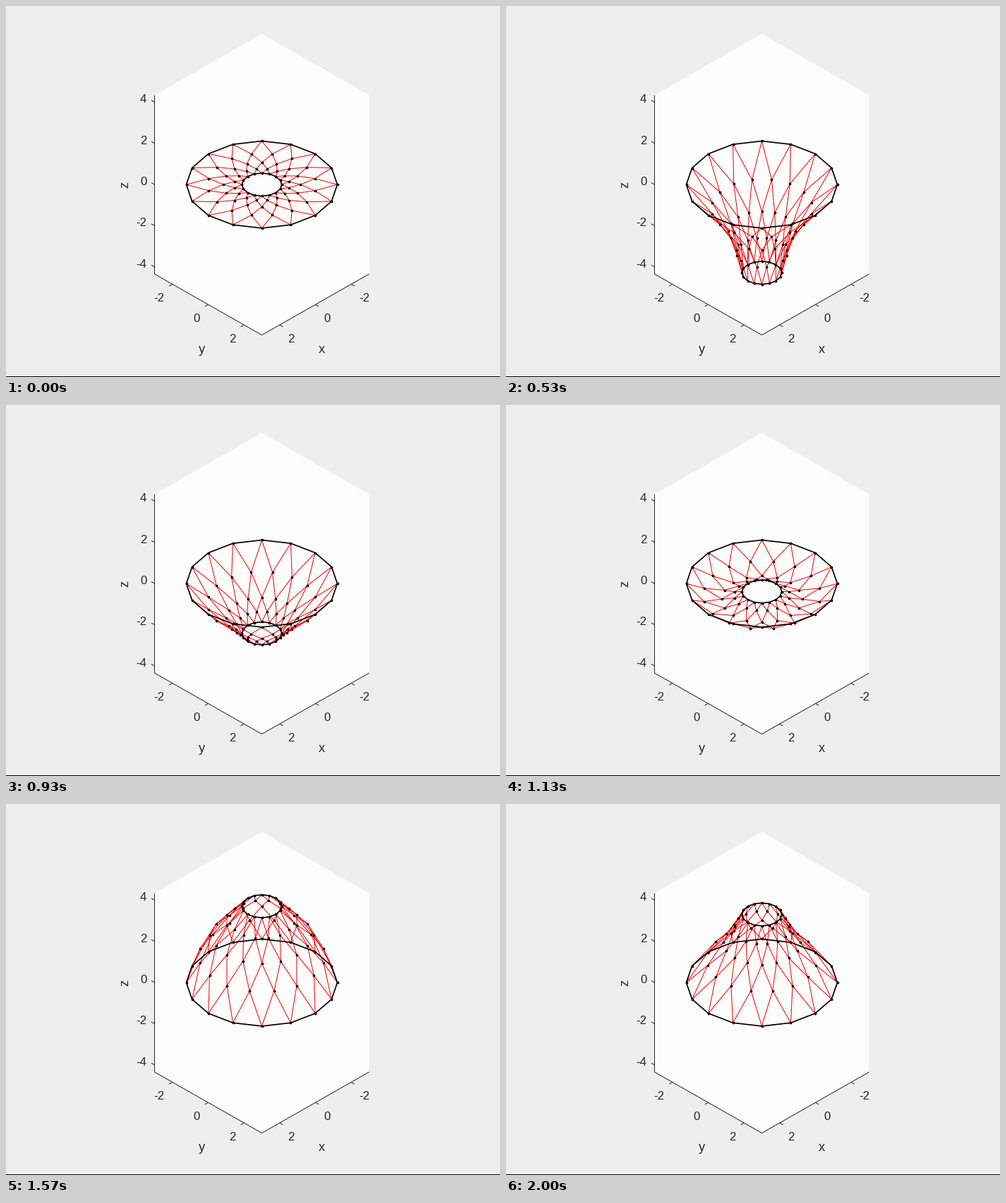
These frames come from a looping animation (700 by 526 pixels, 2030 ms). A matplotlib script:

```python
import numpy as np
import matplotlib.pyplot as plt
from matplotlib.animation import FuncAnimation
from matplotlib.collections import LineCollection
from matplotlib.patches import Polygon, Rectangle

W, H, DPI = 700, 526, 100
PT = 72 / DPI                       # points per pixel
CX, CY = 362.5, 253.2               # projected origin
TILT = 0.577                        # sine of the view elevation
UNIT = 29.2                         # pixels per unit of z
N, R_OUT, R_IN = 16, 107, 28.2
INK = "#262626"

# Poses of the three free rings: radius and drop in pixels
STEP = np.array([0, 4, 10, 22, 34, 41, 53, 60])
RADIUS = np.array([
    [76.5, 54.7, 39.0], [76.0, 53.6, 38.0], [73.9, 50.4, 36.0],
    [71.2, 47.0, 36.5], [83.6, 57.0, 39.4], [85.0, 66.5, 46.0],
    [89.6, 67.3, 44.6], [78.5, 54.4, 40.3]])
DROP = np.array([
    [0, 0, 0], [8.8, 17.8, 28.5], [26.3, 50.1, 72.0],
    [30.4, 60.6, 90.0], [16.0, 22.0, 16.0], [-22.0, -40.4, -50.8],
    [-41.0, -72.3, -101.6], [-32.9, -56.9, -78.0]])
SHARE = np.array([0.29, 0.56, 0.79])  # quasi-static part of the hub's drop


def hub_drop(step):
    """Free swing of the hub on a hardening spring."""
    p = 0.0895 * step
    return 123.55 * np.sin(p) - 2.95 * np.sin(3 * p)


LAG = DROP - np.outer(hub_drop(STEP), SHARE)


def hermite(x, knots, values):
    slope = np.gradient(values, knots, axis=0)
    i = min(np.searchsorted(knots, x, side="right") - 1, len(knots) - 2)
    h = knots[i + 1] - knots[i]
    u = (x - knots[i]) / h
    return ((1 + 2 * u) * (1 - u) ** 2 * values[i]
            + u * (1 - u) ** 2 * h * slope[i]
            + u * u * (3 - 2 * u) * values[i + 1]
            + u * u * (u - 1) * h * slope[i + 1])


def net(step):
    """Screen positions, shape (ring, node, xy)."""
    hub = hub_drop(step)
    r = np.r_[R_OUT, hermite(step, STEP, RADIUS), R_IN]
    d = np.r_[0, SHARE * hub + hermite(step, STEP, LAG), hub]
    turn = np.arange(N) + 0.5 * (np.arange(5) % 2)[:, None]
    a = 2 * np.pi * turn / N
    x = CX + r[:, None] * np.sin(a)
    y = CY + d[:, None] - TILT * r[:, None] * np.cos(a)
    return np.stack([x, y], axis=-1)


def cables(p):
    """Two cables from every node to the next ring inward."""
    segs = []
    for i in range(4):
        side = -1 if i % 2 == 0 else 1
        for shift in (0, side):
            mate = np.roll(p[i + 1], -shift, axis=0)
            segs.append(np.stack([p[i], mate], axis=1))
    return np.concatenate(segs)


fig = plt.figure(figsize=(W / DPI, H / DPI), dpi=DPI, facecolor="#eeeeee")
ax = fig.add_axes([0, 0, 1, 1])
ax.set(xlim=(0, W), ylim=(H, 0))
ax.axis("off")


def line(*pts):
    ax.plot(*zip(*pts), color=INK, lw=1.0 * PT, zorder=2,
            solid_capstyle="butt")


def label(x, y, s, px=16.7, **kw):
    opts = dict(ha="center", va="baseline")
    opts.update(kw)
    ax.text(x, y, s, family="Liberation Sans", fontsize=px * PT, color=INK,
            **opts)


# Axes box
LEFT, RIGHT, TOP, BOTTOM = 210.5, 514.5, 126.5, 380
ax.add_patch(Polygon([(CX, 39.5), (RIGHT, TOP), (RIGHT, BOTTOM),
                      (CX, 466.5), (LEFT, BOTTOM), (LEFT, TOP)],
                     fc="#fdfdfd", ec="none"))
line((LEFT, TOP), (LEFT, BOTTOM), (CX, 466.5), (RIGHT, BOTTOM))
ax.add_patch(Rectangle((0, 524.6), W, 1.4, fc="black", ec="none"))

for z in range(-4, 5, 2):
    y = CY - z * UNIT
    line((LEFT, y), (LEFT - 4.6, y - 2.7))
    label(199.5, y + 0.8, str(z), ha="right")

for k, v in enumerate((-2, 0, 2)):
    f = (2 * k + 1) / 6
    dx, y = 152 * (1 - f), BOTTOM + 86.5 * f
    tx = (145.5, 92.5, 41.5)[k]
    for side in (-1, 1):
        x = CX + side * dx
        line((x, y), (x + side * 4.6, y + 2.7))
        label(CX + side * tx, 419.3 + 29 * k, str(v))

label(277.5, 491.5, "y", 18.3)
label(447.5, 491.5, "x", 18.3)
label(169, 253.3, "z", 18.3, va="center", rotation=90)

# Net
mesh = LineCollection([], linewidths=1.0 * PT, zorder=3)
ax.add_collection(mesh, autolim=False)
rims = [ax.plot([], [], color="black", lw=1.7 * PT, zorder=4)[0]
        for _ in range(2)]
dots, = ax.plot([], [], "o", color="black", ms=3.7 * PT, mew=0, zorder=5)


def draw(tick):
    p = net(int((tick + 0.5) * 0.3))     # 30 poses per second
    segs = cables(p)
    # Upright outer cables lose their colour
    upright = np.abs(segs[:, 0, 0] - segs[:, 1, 0]) < 0.3
    upright[2 * N:] = False
    mesh.set_segments(segs)
    mesh.set_color(["#333333" if u else "#f00000" for u in upright])
    for rim, ring in zip(rims, (p[0], p[-1])):
        rim.set_data(*np.vstack([ring, ring[:1]]).T)
    dots.set_data(*p.reshape(-1, 2).T)
    return [mesh, *rims, dots]


anim = FuncAnimation(fig, draw, frames=203, interval=10, repeat=True,
                     repeat_delay=0, blit=False)
plt.show()
```
